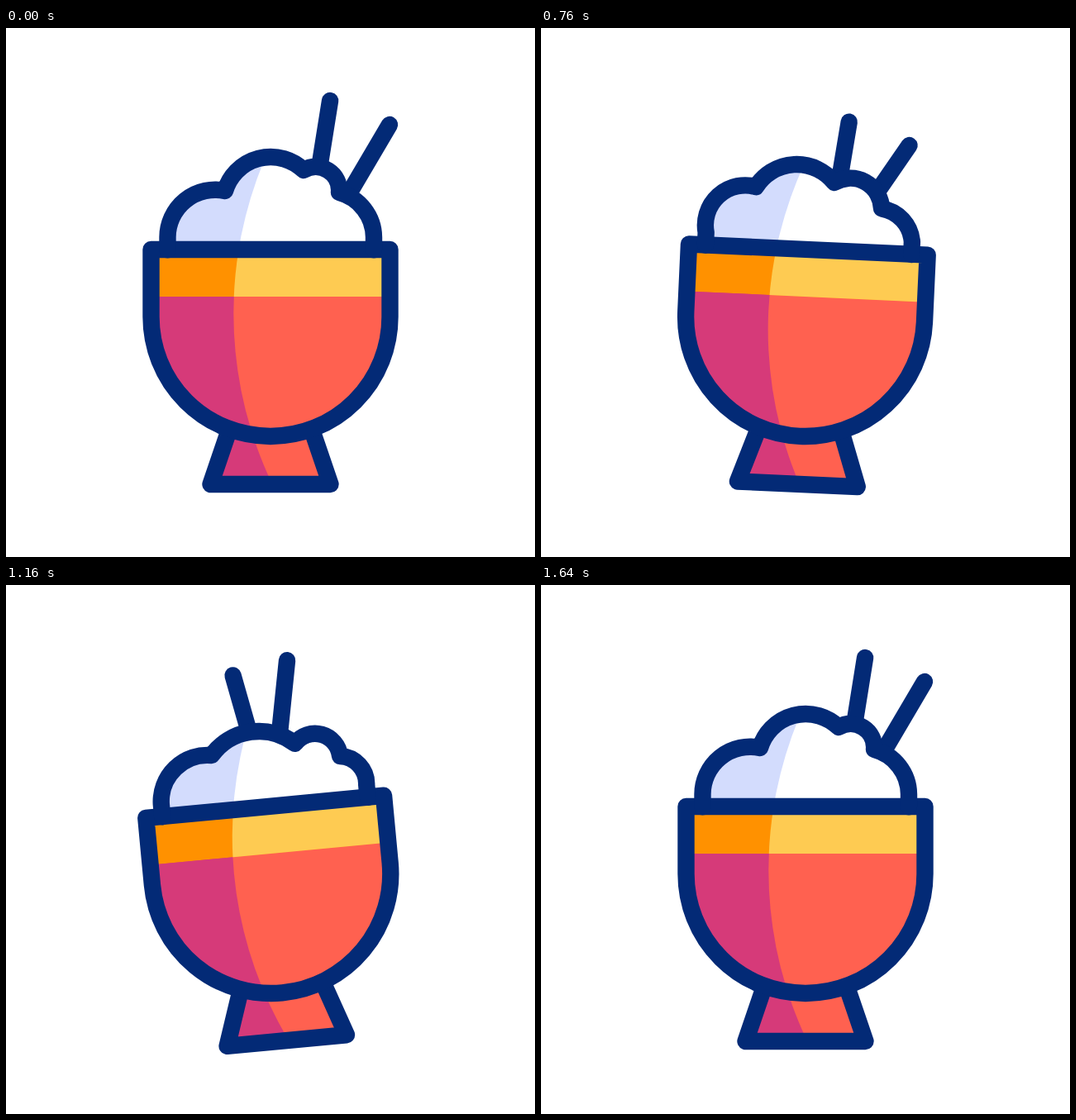
Write an HTML page that moves like this. It is 640x640 px and loops after 1.88 s.

```html
<!DOCTYPE html>
<html lang="en">
<head>
<meta charset="utf-8">
<title>Dessert cup</title>
<style>
  html, body { margin: 0; width: 100%; height: 100%; overflow: hidden; background: #fff; }
  svg { display: block; width: 100vw; height: 100vh; }
  .line { fill: none; stroke: #032a76; stroke-width: 20.4; stroke-linecap: round; stroke-linejoin: round; }
</style>
</head>
<body>
<svg viewBox="0 0 640 640">
  <defs>
    <path id="bowl" d="M175.5 268H464.5V349.5A144.5 144.5 0 0 1 175.5 349.5Z"/>
    <path id="foot" d="M270 486L247.5 552H392.5L370 486Z"/>
    <circle id="light" cx="755.3" cy="345" r="480"/>
    <clipPath id="inBowl"><use href="#bowl"/></clipPath>
    <clipPath id="inFoot"><use href="#foot"/></clipPath>
    <clipPath id="inCream"><path class="cream"/></clipPath>
    <clipPath id="inBand"><rect x="175" y="268" width="290" height="57"/></clipPath>
  </defs>
  <g id="cup">
    <path class="line" id="sticks"/>
    <g clip-path="url(#inCream)">
      <path class="cream" fill="#d3dcfd"/>
      <use href="#light" fill="#fff"/>
    </g>
    <g clip-path="url(#inFoot)">
      <use href="#foot" fill="#d63a79"/>
      <use href="#light" fill="#ff6150"/>
    </g>
    <use href="#foot" class="line"/>
    <g clip-path="url(#inBowl)">
      <use href="#bowl" fill="#d63a79"/>
      <use href="#light" fill="#ff6150"/>
      <g clip-path="url(#inBand)">
        <rect x="175" y="268" width="290" height="57" fill="#ff9100"/>
        <use href="#light" fill="#fecb52"/>
      </g>
    </g>
    <use href="#bowl" class="line"/>
    <path class="cream line"/>
  </g>
</svg>
<script>
const LOOP = 1880, STEP = 40;
const SMOOTH = [1 / 3, 2 / 3];

// x1, y1, x2, y2, x3, y3 of the notches, then radii of the four bumps,
// then base x, base y and tilt of each stick
const REST  = [265, 197, 360, 172, 403, 199, 57.5, 57.6, 28.5, 56.5, 374.7, 196.6, 9.1, 408.2, 211.8, 30.5];
const RIGHT = [251, 193.5, 343, 182, 403, 213.5, 46, 54, 40, 48, 360.5, 218.1, 12.6, 390.7, 234.4, 38.7];
const LEFT  = [261.4, 200.3, 363.8, 197.6, 417.6, 217.1, 56, 72.5, 30.6, 31.3, 310.7, 218.5, -12.5, 335.3, 203.5, 9.3];

// [time, value, ease towards the next key]
const TILT = [
  [0, [0], [.8, .7]], [520, [9], SMOOTH], [1060, [-6.3], SMOOTH],
  [1500, [.7], SMOOTH], [1640, [0]]
];
const TOPPING = [
  [0, REST, [.65, .68]], [630, RIGHT, SMOOTH], [1050, LEFT, SMOOTH], [1640, REST]
];

// cubic-bezier(a, 0, b, 1)
function ease([a, b], x) {
  let lo = 0, hi = 1;
  for (let i = 0; i < 24; i++) {
    const s = (lo + hi) / 2, r = 1 - s;
    if (3 * a * s * r * r + 3 * b * s * s * r + s ** 3 < x) lo = s; else hi = s;
  }
  return lo * lo * (3 - 2 * lo);
}

function sample(keys, t) {
  const last = keys[keys.length - 1];
  if (t >= last[0]) return last[1];
  const i = keys.findIndex(k => k[0] > t) - 1;
  const [t0, from, curve] = keys[i], [t1, to] = keys[i + 1];
  const w = ease(curve, (t - t0) / (t1 - t0));
  return from.map((v, j) => v + (to[j] - v) * w);
}

// half sine wave between two times, 0 elsewhere
function hump(t, t0, t1) {
  return t > t0 && t < t1 ? Math.sin(Math.PI * (t - t0) / (t1 - t0)) : 0;
}

function stick(x, y, deg) {
  const a = deg * Math.PI / 180;
  return `M${x} ${y}L${x + 110 * Math.sin(a)} ${y - 110 * Math.cos(a)}`;
}

const cup = document.getElementById('cup');
const sticks = document.getElementById('sticks');
const creams = document.querySelectorAll('.cream');

function draw(t) {
  const [tilt] = sample(TILT, t);
  const [x1, y1, x2, y2, x3, y3, r1, r2, r3, r4, ax, ay, a, bx, by, b] = sample(TOPPING, t);
  const arc = (r, x, y) => `A${r} ${r} 0 0 1 ${x} ${y}`;
  const d = 'M195.5 268.3V253' + arc(r1, x1, y1) + arc(r2, x2, y2) +
    arc(r3, x3, y3) + arc(r4, 445, 253) + 'V268.3';
  creams.forEach(c => c.setAttribute('d', d));
  // the sticks dip on the way left and rise on the way back
  const lift = 4 * hump(t, 1050, 1640) - 3 * hump(t, 630, 1050);
  sticks.setAttribute('d', stick(ax, ay - lift, a) + stick(bx, by - lift, b));
  cup.setAttribute('transform', `rotate(${tilt} 320 341)`);
}

const start = performance.now();
function tick() {
  const t = (performance.now() - start) % LOOP;
  draw(Math.floor(t / STEP) * STEP);
  requestAnimationFrame(tick);
}
tick();
</script>
</body>
</html>
```
